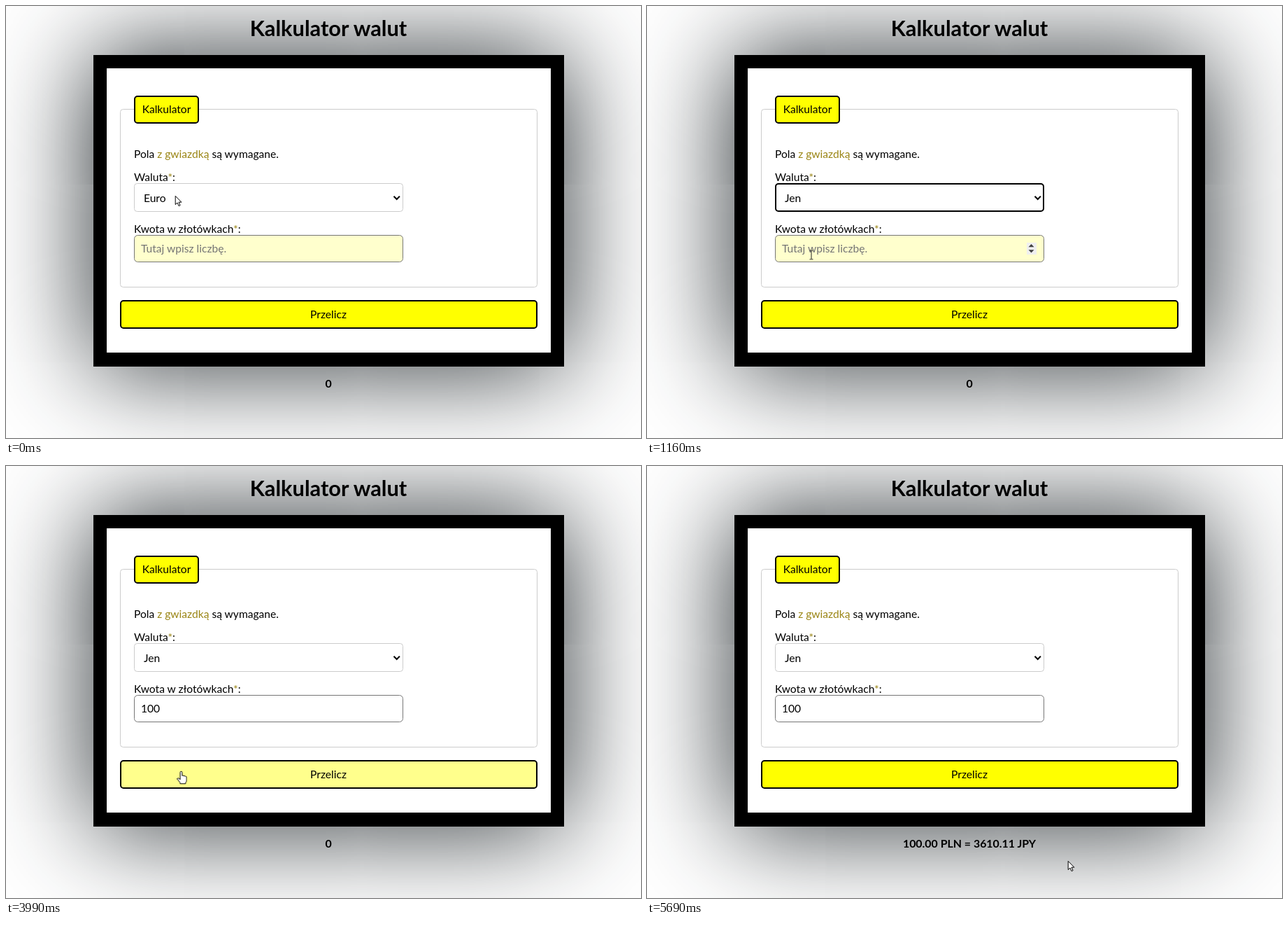
Write an HTML page that moves like this. It is 908 px wide and 617 px high and loops after 5760 ms.

```html
<!DOCTYPE html>
<html lang="pl">
<head>
<meta charset="utf-8">
<title>Kalkulator walut</title>
<style>
html, body { margin: 0; width: 100%; height: 100%; overflow: hidden; background: #fff; }
.card {
  position: absolute; left: 125px; top: 70px; width: 635px; height: 406px;
  border: solid #000; border-width: 19px 19px 20px; background: #fff;
  box-shadow: 0 0 150px #1b2226;
}
svg { position: absolute; left: 0; top: 0; }
text { font: 15.6px Lato, "Open Sans", sans-serif; fill: #000; }
.mid { text-anchor: middle; }
.title { font-size: 30.8px; font-weight: 700; }
.result { font-size: 15.9px; font-weight: 700; }
.req { fill: #9a8514; }
.hint { fill: #757575; }
.line { fill: #fff; stroke: #ccc; }
.bold { stroke: #000; stroke-width: 2; }
.yellow { fill: #ff0; }
.ring { fill: none; }
.popup { fill: #fff; stroke: #858585; filter: drop-shadow(0 10px 16px rgba(0, 0, 0, .25)); }
.lit rect { fill: #1967d2; }
.lit text { fill: #fff; }
.pointer { fill: #fff; stroke: #000; stroke-linejoin: round; }

/* One loop is 5760 ms; states switch hard. */
.s { animation: 5760ms step-end infinite; }
.menu { animation-name: menu; }
.r0 { animation-name: r0; }
.r1 { animation-name: r1; }
.r2 { animation-name: r2; }
.r3 { animation-name: r3; }
.euro { animation-name: euro; }
.jen { animation-name: jen; }
.select-focus { animation-name: selectFocus; }
.input-focus { animation-name: inputFocus; }
.spin { animation-name: spin; }
.field { animation-name: field; }
.empty { animation-name: empty; }
.d1 { animation-name: d1; }
.d2 { animation-name: d2; }
.d3 { animation-name: d3; }
.caret { animation-name: caret; }
.button { animation-name: button; }
.before { animation-name: before; }
.after { animation-name: after; }
.arrow { animation-name: arrow; }
.beam { animation-name: beam; }
.hand { animation-name: hand; }
.path { animation: path 5760ms linear infinite; }

@keyframes menu { 0%, 16.6%, to { opacity: 0 } 1.2% { opacity: 1 } }
@keyframes r0 { 0%, 8.3%, to { opacity: 0 } 1.2% { opacity: 1 } }
@keyframes r1 { 0%, 10.7%, to { opacity: 0 } 8.3% { opacity: 1 } }
@keyframes r2 { 0%, 14.35%, to { opacity: 0 } 10.7% { opacity: 1 } }
@keyframes r3 { 0%, 16.6%, to { opacity: 0 } 14.35% { opacity: 1 } }
@keyframes euro { 0% { opacity: 1 } 16.6%, to { opacity: 0 } }
@keyframes jen { 0% { opacity: 0 } 16.6%, to { opacity: 1 } }
@keyframes selectFocus { 0%, 25.8%, to { opacity: 0 } 16.6% { opacity: 1 } }
@keyframes inputFocus { 0%, 69.2%, to { opacity: 0 } 25.8% { opacity: 1 } }
@keyframes spin { 0%, 69.2%, to { opacity: 0 } 20.1% { opacity: 1 } }
@keyframes field { 0% { fill: #ffffcd } 37.4%, to { fill: #fff } }
@keyframes empty { 0% { opacity: 1 } 37.4%, to { opacity: 0 } }
@keyframes d1 { 0% { opacity: 0 } 37.4%, to { opacity: 1 } }
@keyframes d2 { 0% { opacity: 0 } 40%, to { opacity: 1 } }
@keyframes d3 { 0% { opacity: 0 } 42.3%, to { opacity: 1 } }
@keyframes caret {
  0%, 35.2%, 51.5%, 69.2%, to { opacity: 0; transform: none }
  25.8% { opacity: 1; transform: none }
  37.4% { opacity: 1; transform: translateX(8px) }
  40% { opacity: 1; transform: translateX(17px) }
  42.3%, 59.85% { opacity: 1; transform: translateX(26px) }
}
@keyframes button {
  0%, 82.05%, to { fill: #ff0 }
  59.85%, 70.4% { fill: #ff6 }
  69.2% { fill: #ffff8c }
}
@keyframes before { 0% { opacity: 1 } 70.4%, to { opacity: 0 } }
@keyframes after { 0% { opacity: 0 } 70.4%, to { opacity: 1 } }
@keyframes arrow { 0%, 53.85%, 82.05%, to { opacity: 1 } 20.1%, 59.85% { opacity: 0 } }
@keyframes beam { 0%, 53.85%, to { opacity: 0 } 20.1% { opacity: 1 } }
@keyframes hand { 0%, 82.05%, to { opacity: 0 } 59.85% { opacity: 1 } }
@keyframes path {
  0% { transform: translate(242px, 271px) }
  2.4% { transform: translate(242px, 271px); animation-timing-function: steps(5) }
  8.3% { transform: translate(245px, 323px); animation-timing-function: steps(5) }
  14.35%, 16.6% { transform: translate(235px, 353px) }
  20.1% { transform: translate(235px, 355.5px) }
  51.5% { transform: translate(235px, 355.5px); animation-timing-function: steps(6) }
  58.6% { transform: translate(245px, 417px); animation-timing-function: steps(2) }
  61.05% { transform: translate(248px, 433px); animation-timing-function: steps(2) }
  63.5% { transform: translate(250.5px, 436px) }
  79.65% { transform: translate(250.5px, 436px); animation-timing-function: steps(8) }
  89.35% { transform: translate(391px, 557px); animation-timing-function: steps(4) }
  94.05% { transform: translate(505px, 571px); animation-timing-function: steps(4) }
  98.7%, to { transform: translate(602px, 564px) }
}
</style>
</head>
<body>
<div class="card"></div>
<svg width="908" height="617" viewBox="0 0 908 617">
  <defs>
    <clipPath id="list"><rect x="184" y="294" width="383.5" height="78.5" rx="7"/></clipPath>
  </defs>

  <text class="mid title" x="461" y="43">Kalkulator walut</text>

  <rect class="line" x="163.5" y="147.5" width="596" height="254" rx="4"/>
  <rect class="bold yellow" x="184" y="129" width="91" height="38" rx="4"/>
  <text class="mid" x="229.5" y="153">Kalkulator</text>
  <text x="183" y="217">Pola <tspan class="req">z gwiazdką</tspan> są wymagane.</text>

  <text x="183" y="250">Waluta<tspan class="req">*</tspan>:</text>
  <rect class="line" x="183.5" y="253.5" width="384" height="40" rx="4"/>
  <rect class="bold ring s select-focus" x="184" y="254" width="383" height="39" rx="4"/>
  <text class="s euro" x="197" y="279.5">Euro</text>
  <text class="s jen" x="197" y="279.5">Jen</text>
  <path class="bold ring" d="M554.5 271.8l4.2 4.2 4.2-4.2"/>

  <text x="183" y="324">Kwota w złotówkach<tspan class="req">*</tspan>:</text>
  <rect class="s field" x="183.5" y="327.5" width="384" height="38" rx="5" stroke="#767676"/>
  <rect class="bold ring s input-focus" x="184" y="328" width="383" height="37" rx="4.5"/>
  <text class="hint s empty" x="193" y="352">Tutaj wpisz liczbę.</text>
  <text x="193" y="352"><tspan class="s d1" opacity="0"></tspan></text>
  <g>
    <text class="s d1" x="193" y="352">1</text>
    <text class="s d2" x="202.05" y="352">0</text>
    <text class="s d3" x="211.1" y="352">0</text>
  </g>
  <rect class="s caret" x="193" y="337" width="1" height="18"/>
  <g class="s spin">
    <rect x="543" y="338" width="14" height="17" fill="#efefef"/>
    <path d="M545.5 344.3l4-4.3 4 4.3zM545.5 348.2l4 4.3 4-4.3z" fill="#404040"/>
  </g>

  <rect class="bold s button" x="164" y="421" width="595" height="39" rx="4"/>
  <text class="mid" x="461" y="446">Przelicz</text>

  <text class="mid result s before" x="461" y="544.5">0</text>
  <text class="mid result s after" x="461" y="544.5">100.00 PLN = 3610.11 JPY</text>

  <g class="s menu">
    <rect class="popup" x="184.5" y="294.5" width="382.5" height="77.8" rx="6.5"/>
    <text x="198" y="310.3">Euro</text>
    <text x="198" y="329.5">Funt brytyjski</text>
    <text x="198" y="348.8">Dolar amerykański</text>
    <text x="198" y="368">Jen</text>
    <g class="lit" clip-path="url(#list)">
      <g class="s r0"><rect x="184" y="295" width="384" height="19.5"/><text x="198" y="310.3">Euro</text></g>
      <g class="s r1"><rect x="184" y="314.5" width="384" height="19.3"/><text x="198" y="329.5">Funt brytyjski</text></g>
      <g class="s r2"><rect x="184" y="333.8" width="384" height="19.3"/><text x="198" y="348.8">Dolar amerykański</text></g>
      <g class="s r3"><rect x="184" y="353" width="384" height="20"/><text x="198" y="368">Jen</text></g>
    </g>
  </g>

  <g class="path">
    <path class="pointer s arrow" d="M.2.4V12.6L3 10l2.1 4.6 2-.9L5 9.2h3.9z"/>
    <path class="ring s beam" stroke="#222" d="M-2.5-6.3H-.6L0-5.8.6-6.3H2.5M0-6V6M-2.5 6.3H-.6L0 5.8.6 6.3H2.5"/>
    <path class="pointer s hand" d="M-1.4 11V1.6a1.4 1.4 0 0 1 2.8 0V6.3q1.3-.9 2.6.5 1.3-.7 2.4.6 1.4-.2 1.4 1.6v4q0 2-1.5 3.2V17.8H-1.6V16.3L-5 11.6q-.8-1.6.6-2 1-.1 3 2.4z"/>
  </g>
</svg>
</body>
</html>
```
